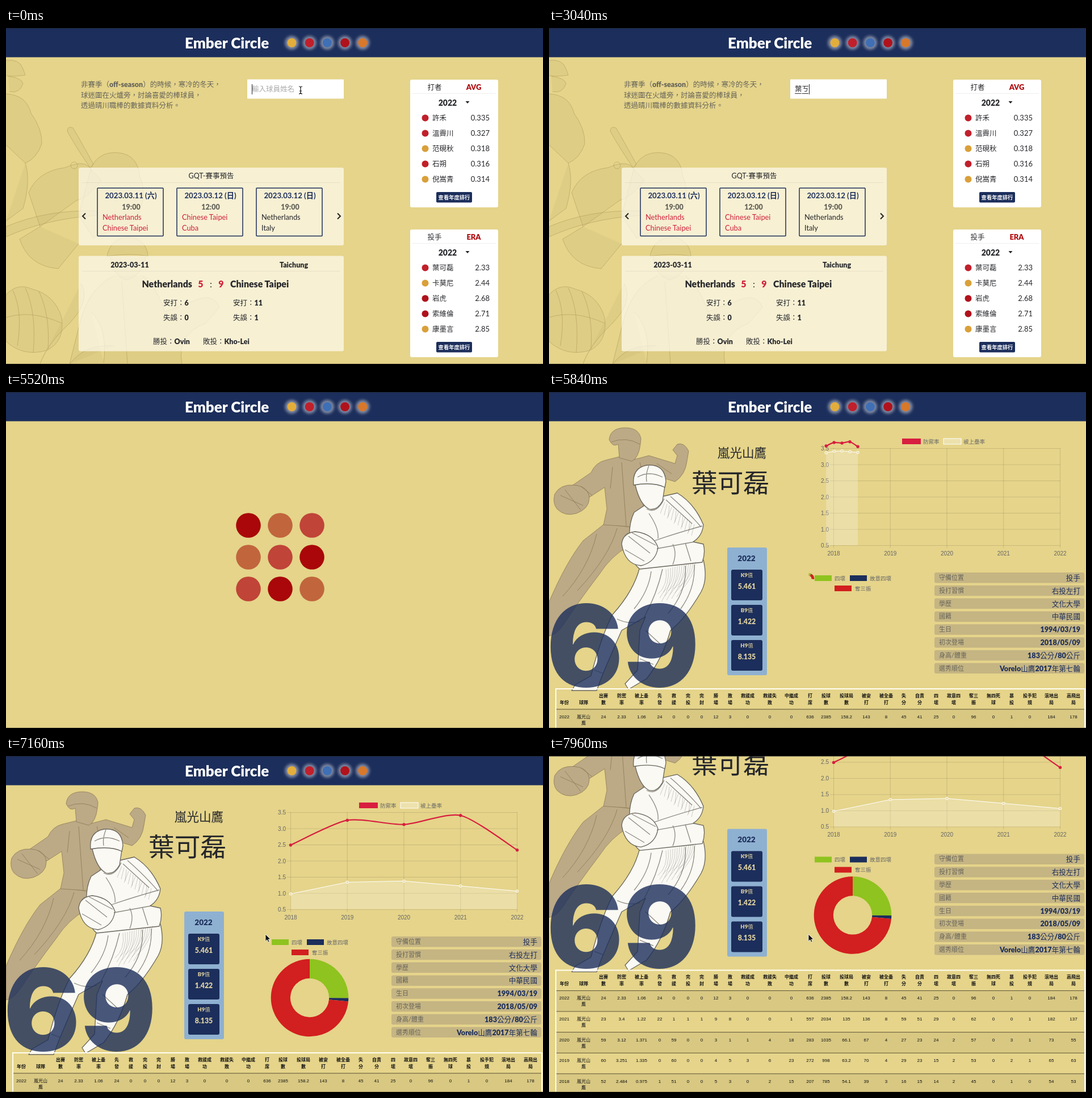
Recreate the animation shown at these times as an HTML page. Size 946 by 592 pixels, loop 8 s.

```html
<!DOCTYPE html>
<html lang="zh-Hant">
<head>
<meta charset="utf-8">
<style>
html, body { margin: 0; width: 100%; height: 100%; overflow: hidden; background: #e5d48a; }
svg { display: block; fill: #26272b; font-family: Lato, 'Noto Sans CJK TC', 'Noto Sans CJK', sans-serif; }
text { white-space: pre; }
.b { font-weight: 900; }
.m { text-anchor: middle; }
.e { text-anchor: end; }
.navy { fill: #1c2e5b; }
.red { fill: #d0213c; }
.gray { fill: #65635a; }
.white { fill: #fff; }
.axis { font-family: 'Liberation Sans', 'Noto Sans CJK TC', 'Noto Sans CJK', sans-serif; fill: #666; }
.cell { font-family: 'Liberation Sans', 'Noto Sans CJK TC', 'Noto Sans CJK', sans-serif; fill: #111; text-anchor: middle; }
</style>
</head>
<body>
<svg id="stage" width="946" height="592" viewBox="0 0 946 592"></svg>
<script>
const NAVY = '#1c2e5b', RED = '#d81e3f', PLAYER = '葉可磊', TEAM = '嵐光山鷹';
const GOLD = '#d9a03a', CRIMSON = '#c0202b', WINE = '#b0121c';

const text = (x, y, size, str, cls = '', more = '') =>
  `<text x="${x}" y="${y}" font-size="${size}" class="${cls}" ${more}>${str}</text>`;
const rect = (x, y, w, h, fill, more = '') =>
  `<rect x="${x}" y="${y}" width="${w}" height="${h}" fill="${fill}" ${more}/>`;
const path = (d, fill = 'none', more = '') => `<path d="${d}" fill="${fill}" ${more}/>`;
const dot = (x, y, r, fill, more = '') => `<circle cx="${x}" cy="${y}" r="${r}" fill="${fill}" ${more}/>`;
const boldLatin = s => s.replace(/[!-~]+/g, '<tspan class="b">$&</tspan>');
const each = (list, draw) => list.map(draw).join('');

function header() {
  const marks = ['#e3ad3c', CRIMSON, '#3f6fb5', WINE, '#d8782a'];
  return rect(0, 0, 946, 51.5, NAVY) + text(315, 36, 26, 'Ember Circle', 'b white') +
    each(marks, (c, i) => dot(503.5 + i * 31.2, 26, 12, '#fff', 'opacity=".45" filter="url(#glow)"') +
      dot(503.5 + i * 31.2, 26, 8, c));
}

function backdrop() {
  const shapes = [
    'M0 57Q24 54 30 72L34 83Q14 86 0 84M4 85Q28 88 30 98Q24 116 6 112M0 116Q36 118 44 150Q64 178 63 204Q54 230 34 238L0 206M34 238Q44 270 30 318L0 340',
    'M108 182Q108 172 118 176Q130 196 154 240L148 246Q122 208 108 182Z',
    'M40 290Q56 252 104 246Q140 230 150 250L168 268Q144 300 124 304L60 350ZM60 350L24 372Q40 420 92 424L128 380',
    'M150 246Q164 216 200 220Q232 224 236 262Q252 300 226 340L154 370L128 330Z',
    'M0 350Q70 320 160 322L162 330Q70 336 0 368Z',
    'M0 470Q20 448 46 460Q86 470 98 510Q104 552 72 568Q30 580 0 552ZM12 462Q30 500 20 560M34 458Q54 500 48 572M58 464Q78 506 74 566M0 510Q44 496 98 520',
    'M178 402Q184 370 218 368Q248 374 250 402Q220 396 178 402ZM184 404Q186 434 212 444Q240 436 246 404',
    'M192 436Q146 456 130 520L112 592H310Q300 540 352 520L376 492Q366 468 338 478L280 500Q262 450 240 436M204 446L214 592M150 500Q180 530 172 590',
    'M60 592Q70 560 112 520Q150 480 132 450M112 592Q140 556 190 560'
  ];
  return `<g stroke="#9d8850" stroke-opacity=".42" stroke-linejoin="round">` +
    each(shapes, d => path(d, '#b9a566', 'fill-opacity=".16"')) +
    dot(120, 242, 6, 'none') + '</g>';
}

function ranking(y, title, stat, rows) {
  return rect(712, y, 155, 225, '#fff', 'rx="3"') +
    text(755, y + 18, 12.5, title, 'm') +
    text(824, y + 18, 13, stat, 'b m', 'style="fill:#b00d10"') +
    rect(716, y + 24, 147, 1, '#eee') + text(778, y + 45.5, 14, '2022', 'b m') +
    path(`M809.5 ${y + 38}h7l-3.5 4z`, '#222') +
    each(rows, ([color, name, value], i) => {
      const cy = y + 67.5 + i * 27;
      return dot(738.5, cy, 6, color) + text(751, cy + 4.5, 12.5, name) + text(852, cy + 4, 13, value, 'e');
    }) +
    rect(758, y + 198, 63, 18.5, NAVY, 'rx="2"') +
    text(789.5, y + 210.5, 9.3, '查看年度排行', 'm white', 'font-weight="700"');
}

function home() {
  const games = [
    ['2023.03.11 (六)', '19:00', 'Netherlands', 'Chinese Taipei', 'red'],
    ['2023.03.12 (日)', '12:00', 'Chinese Taipei', 'Cuba', 'red'],
    ['2023.03.12 (日)', '19:00', 'Netherlands', 'Italy', '']
  ];
  const panel = (y, h) => rect(128, y, 467, h, '#fffdf3', 'fill-opacity=".7" rx="3"');
  const rule = y => rect(134, y, 455, 1, '#000', 'opacity=".06"');
  const intro = ['非賽季（off-season）的時候，寒冷的冬天，', '球迷圍在火爐旁，討論喜愛的棒球員，', '透過晴川職棒的數據資料分析。'];
  return backdrop() +
    each(intro, (s, i) => text(132, 104 + i * 18.7, 12.5, boldLatin(s), 'gray')) +
    rect(425, 90.5, 170, 34, '#fff', 'rx="1"') +
    text(433, 112, 12.5, '輸入球員姓名', '', 'id="hint" style="fill:#aaa"') +
    text(433, 112, 12.5, '', '', 'id="typed"') + '<path id="under" stroke="#333"/>' +
    rect(433, 99, 1, 18, '#222', 'id="caret"') +
    path('M516 103q3 0 3 2v9q0 2-3 2M522 103q-3 0-3 2v9q0 2 3 2M517 111h4', 'none', 'id="beam" stroke="#111" stroke-width="1.2"') +
    panel(246, 137) + text(361.5, 265, 12.5, 'GQT-賽事預告', 'm') + rule(272) +
    each(games, ([date, time, a, b, cls], i) => {
      const x = 161 + i * 140;
      return rect(x, 282, 116, 84.5, 'none', `stroke="${NAVY}" stroke-width="1.5" rx="1"`) +
        text(x + 59, 300, 13.2, date, 'm navy', 'font-weight="700"') +
        text(x + 59.5, 320, 12.5, time, 'm b gray') +
        text(x + 9, 338, 12.8, a, cls) + text(x + 9, 356.5, 12.8, b, cls);
    }) +
    path('M140 326.5l-5 5 5 5M584 326.5l5 5-5 5', 'none', 'stroke="#222" stroke-width="2"') +
    panel(401.5, 168) + rule(428) +
    text(218, 422, 12.5, '2023-03-11', 'm b') + text(507, 422, 12.5, 'Taichung', 'm b') +
    text(328, 457, 16, 'Netherlands', 'e b') + text(395, 457, 16, 'Chinese Taipei', 'b') +
    text(343, 457, 16, '5', 'm b red') + text(361, 457, 16, ':', 'm') + text(379, 457, 16, '9', 'm b red') +
    each([[277, 489, '安打：6'], [400, 489, '安打：11'], [277, 515, '失誤：0'], [400, 515, '失誤：1'],
      [259, 557, '勝投：Ovin'], [347, 557, '敗投：Kho-Lei']],
      ([x, y, s]) => text(x, y, 12.5, boldLatin(s))) +
    ranking(91, '打者', 'AVG', [[CRIMSON, '許禾', '0.335'], [CRIMSON, '溫霽川', '0.327'], [GOLD, '范硯秋', '0.318'],
      [CRIMSON, '石朔', '0.316'], [GOLD, '倪嵩青', '0.314']]) +
    ranking(355, '投手', 'ERA', [[CRIMSON, PLAYER, '2.33'], [GOLD, '卡莫尼', '2.44'], [WINE, '岩虎', '2.68'],
      [WINE, '索維倫', '2.71'], [GOLD, '康墨言', '2.85']]);
}

function loader() {
  const colors = ['#a90709', '#c1653d', '#c04438'];
  return each([...Array(9).keys()], i => {
    const col = i % 3, row = i / 3 | 0;
    return dot(427 + col * 56, 235 + row * 56, 21.8, colors[(col + row) % 3]);
  });
}

function pitchers() {
  const rear = [
    'M98 232L156 240L140 272Q110 288 88 322Q50 372 24 412Q12 428 0 430V370Q30 300 60 262Z',
    'M124 114L100 120Q82 124 74 142L42 164L64 190L98 168L102 206L96 234L186 240L196 150L222 158Q240 146 243 122L246 104Q238 88 226 92L218 102L226 112L222 126L176 112L146 120Z',
    'M106 84Q108 64 132 63Q158 62 162 82L161 92Q158 116 146 122L124 116L122 92Q112 98 106 84Z',
    'M10 180Q20 162 44 164Q70 166 71 188Q70 206 48 214Q28 220 14 206Q6 196 10 180Z'
  ];
  const front = [
    'M160 308L272 296Q280 330 268 352Q240 400 214 420Q200 470 172 505L140 524L134 514L156 490L160 420L170 396L128 420Q106 470 92 504L84 526H40L46 516L74 500Q92 430 112 392Q150 350 160 308Z',
    'M168 200L200 184L226 178Q256 196 272 234Q270 254 254 264L272 268Q276 284 270 300L160 312Q140 296 142 262Q140 232 150 212Z',
    'M152 164Q176 156 204 166L200 192Q190 210 176 206Q160 198 152 164Z',
    'M149 164Q146 134 172 129Q204 126 206 158L204 168Q184 158 149 164Z',
    'M128 268Q130 248 152 246Q184 250 192 274Q188 300 162 306Q134 304 128 268Z'
  ];
  const folds = 'M172 206Q190 216 203 188M206 190L252 232M214 184Q244 210 268 238M190 276L256 264M186 262Q220 250 270 236' +
    'M176 214Q194 240 192 258M218 268Q226 284 218 304M240 266L250 298M140 254L178 284M134 278L168 298M146 248L188 270' +
    'M240 306Q244 350 210 390M256 304Q258 346 232 382M180 316Q176 350 150 382M200 312Q190 356 168 396M120 400Q140 410 160 404' +
    'M170 420L196 444M160 470L184 480M80 490L96 496M156 150Q176 138 200 150M176 130Q170 144 172 158';
  const shade = 'M128 124L136 236M112 132L108 170M160 124Q174 170 160 236M190 126L216 144M56 166L76 182M20 182L60 200M28 172L56 208' +
    'M84 250Q70 310 24 360M120 240Q106 290 50 350M110 88Q136 78 160 92';
  const strokes = [...Array(14).keys()];
  const hatch = each(strokes, i => `M${206 + i * 4} ${312 - i}q${4 - i / 2} 28 -${14 + i} ${44 + i % 3 * 8}`) +
    each(strokes, i => `M${204 + i * 4} ${194 + i * 3}l${i % 3 * 3 - 8} 20`);
  return `<g stroke="#857452" stroke-opacity=".7" stroke-linejoin="round">` +
    each(rear, d => path(d, '#bca986')) + path(shade) + '</g>' +
    `<g stroke="#69655a" stroke-width="1.3" stroke-linejoin="round">` +
    each(front, d => path(d, '#faf9f4')) + path(folds, 'none', 'stroke-opacity=".75"') +
    path(hatch, 'none', 'stroke-opacity=".3" stroke-width="1"') + '</g>';
}

function lineAxes() {
  let out = '';
  for (let i = 0; i < 7; i++) {
    const y = 99 + i * 28.5;
    out += rect(495, y, 406, 1, '#000', 'opacity=".12"') + text(493, y + 4, 10, (3.5 - i / 2).toFixed(1), 'axis e');
  }
  for (let i = 0; i < 5; i++) {
    const x = 501 + i * 99.75;
    out += rect(x, 99, 1, 176, '#000', 'opacity=".12"') + text(x + .5, 288, 10, 2018 + i, 'axis m');
  }
  return out;
}

const HEADS = ('年份 球隊 出賽/數 防禦/率 被上壘/率 先/發 救/援 完/投 完/封 勝/場 敗/場 救援成/功 救援失/敗 中繼成/功 打/席 投球/數 投球局/數 ' +
  '被安/打 被全壘/打 失/分 自責/分 四/壞 故意四/壞 奪三/振 無四死/球 暴/投 投手犯/規 滾地出/局 高飛出/局').split(' ');
const COLS = [27, 61, 96, 128, 163, 195, 220, 245, 269, 294, 319, 350, 389, 427, 460, 488, 524, 559, 594, 625, 653, 682, 713, 748, 783, 815, 847, 885, 924];
const SEASONS = [
  '24 2.33 1.06 24 0 0 0 12 3 0 0 0 636 2385 158.2 143 8 45 41 25 0 96 0 1 0 184 178',
  '23 3.4 1.22 22 1 1 1 9 8 0 0 1 557 2034 135 136 8 59 51 29 0 62 0 0 1 182 137',
  '59 3.12 1.371 0 59 0 0 3 1 1 4 18 283 1035 66.1 67 4 27 23 24 2 57 0 3 1 73 55',
  '60 3.251 1.335 0 60 0 0 4 5 3 6 23 272 998 63.2 70 4 29 23 15 2 53 0 2 1 65 63',
  '52 2.484 0.975 1 51 0 0 5 3 0 2 15 207 785 54.1 39 3 16 15 14 2 45 0 1 0 54 53'
].map(s => s.split(' '));

function table() {
  const cell = (i, y, s) => text(COLS[i], y, 8, s, 'cell');
  return '<g font-weight="700">' + each(HEADS, (h, i) => {
      const [a, b] = h.split('/');
      return b ? cell(i, 538, a) + cell(i, 550, b) : cell(i, 550, a);
    }) + '</g>' +
    each(SEASONS, (row, r) => {
      const top = 558.5 + r * 36.6, y = top + 16.5;
      return (r % 2 ? '' : rect(12, top, 932, 36.6, '#000', 'opacity=".055"')) +
        rect(13, top, 930, 1, '#5d5538') + cell(0, y, 2022 - r) +
        cell(1, y, TEAM.slice(0, 3)) + cell(1, y + 11, TEAM[3]) + each(row, (v, i) => cell(i + 2, y, v));
    }) +
    rect(12, 523, 932, 230, 'none', 'stroke="#fffdf0" stroke-width="2"');
}

function profile() {
  const rates = [['K9', '5.461'], ['B9', '1.422'], ['H9', '8.135']];
  const facts = [['守備位置', '投手'], ['投打習慣', '右投左打'], ['學歷', '文化大學'], ['國籍', '中華民國'], ['生日', '1994/03/19'],
    ['初次登場', '2018/05/09'], ['身高/體重', '183公分/80公斤'], ['選秀順位', 'Vorelo山鷹2017年第七輪']];
  const key = (x, y, w, fill, label, gap, more) =>
    rect(x, y, w, 10, fill, more) + text(x + w + gap, y + 9, 9.5, label, 'axis');
  return pitchers() +
    text(-4, 518.5, 199, '69', 'navy', 'opacity=".8" style="font-family:Inter,sans-serif;font-weight:900"') +
    text(340, 115, 21.6, TEAM, 'm') + text(319.5, 177, 45.7, PLAYER, 'm') +
    rect(314, 274, 70, 225, '#8fb1d1', 'rx="3"') + text(348, 298, 13.5, '2022', 'm b navy') +
    each(rates, ([k, v], i) => {
      const y = 313 + i * 62;
      return rect(321, y, 55, 54, NAVY, 'rx="3"') + '<g style="fill:#ddd0a0">' +
        text(348.5, y + 13, 9.5, boldLatin(k + '值'), 'm') + text(348.5, y + 34, 12.3, v, 'm b') + '</g>';
    }) +
    lineAxes() + key(622, 82, 33, RED, '防禦率', 4) +
    key(695, 82, 31, '#fff', '被上壘率', 4, 'fill-opacity=".3" stroke="#fff"') +
    key(468, 323, 30, '#8fc31f', '四壞', 5) + key(530, 323, 30, NAVY, '故意四壞', 5) + key(503, 341, 30, '#d21f1f', '奪三振', 6) +
    '<g id="chart"></g>' +
    each(facts, ([k, v], i) => {
      const y = 318 + i * 22.8;
      return rect(679, y, 264, 18.5, '#c5b583', 'rx="3"') + text(687, y + 13, 11, k, 'gray') +
        text(936, y + 14, 12.6, boldLatin(v), 'e navy');
    }) + table();
}

const ERA = SEASONS.map(r => +r[1]).reverse(), WHIP = SEASONS.map(r => +r[2]).reverse();
const quart = t => 1 - (1 - Math.min(1, Math.max(0, t))) ** 4;
const mix = (a, b, p) => a + (b - a) * p;

function slice(a0, a1, cx, cy, R, fill) {
  const at = (a, r) => `${cx + r * Math.sin(a)} ${cy - r * Math.cos(a)}`;
  const big = a1 - a0 > Math.PI ? 1 : 0, r = R / 2;
  return path(`M${at(a0, R)}A${R} ${R} 0 ${big} 1 ${at(a1, R)}L${at(a1, r)}A${r} ${r} 0 ${big} 0 ${at(a0, r)}Z`, fill);
}

function charts(t) {
  const p = quart((t - 5804) / 1000), turn = quart((t - 5766) / 1000) * 2 * Math.PI;
  const place = list => list.map((v, i) => [mix(486, 501.5 + i * 99.75, p), mix(85, 270 - (v - .5) * 57, p)]);
  const era = place(ERA), whip = place(WHIP);
  const curve = era.slice(1).map((b, i) => {
    const a = era[i], before = era[i - 1] || a, after = era[i + 2] || b, k = .12;
    return `C${a[0] + (b[0] - before[0]) * k} ${a[1] + (b[1] - before[1]) * k} ` +
      `${b[0] - (after[0] - a[0]) * k} ${b[1] - (after[1] - a[1]) * k} ${b}`;
  }).join('');
  // shares of walks, intentional walks and strikeouts over all seasons
  const sums = [19, 20, 21].map(c => SEASONS.reduce((s, r) => s + +r[c], 0));
  const total = sums[0] + sums[1] + sums[2];
  let a = 0;
  return path(`M${whip.join('L')}L${whip[4][0]} 270L${whip[0][0]} 270Z`, '#fff', 'opacity=".24"') +
    path(`M${whip.join('L')}`, 'none', 'stroke="#fff"') + each(whip, q => dot(...q, 2.3, '#e9dda5', 'stroke="#fff"')) +
    path(`M${era[0]}${curve}`, 'none', `stroke="${RED}" stroke-width="2.2"`) + each(era, q => dot(...q, 2.7, RED)) +
    each(sums, (n, i) => slice(a, a += n / total * turn, mix(445, 535, p), mix(313, 426, p), 68.3 * p,
      ['#8fc31f', NAVY, '#d21f1f'][i]));
}

const stage = document.getElementById('stage');
stage.innerHTML = '<defs><filter id="glow" x="-50%" y="-50%" width="200%" height="200%"><feGaussianBlur stdDeviation="2.5"/></filter></defs>' +
  `<g id="page"><g id="home">${home()}</g><g id="load">${loader()}</g><g id="player">${profile()}</g>${header()}</g>` +
  path('M0 0V12.5L3 9.8L5 14.2L7 13.3L5.2 9H9Z', '#111', 'id="mouse" stroke="#fff" stroke-width=".8"') +
  rect(0, 0, 946, 1, '#1f2429', 'opacity=".7"') + rect(0, 591, 946, 1, '#8d8459', 'opacity=".7"');

const el = id => document.getElementById(id);
const show = (id, on) => el(id).style.display = on ? '' : 'none';
const TYPING = [[0, ''], [1320, 'ㄧ'], [1680, 'ㄧㄝ'], [2160, '葉'], [3000, '葉ㄎ'], [3300, '葉ㄎㄜ'], [3560, '葉可'],
  [3800, '葉可ㄌ'], [4080, '葉可ㄌㄟ'], [4400, PLAYER]];

function scrollAt(t) {
  if (t < 7180) return 0;
  if (t < 7360) return 147 * (1 - (1 - (t - 7180) / 180) ** 3);
  return 145.5 + 1.5 * Math.exp((7360 - t) / 150);
}

function draw(t) {
  show('home', t < 5520);
  show('load', t >= 5520 && t < 5800);
  show('player', t >= 5800);
  show('mouse', t >= 6880);
  el('page').setAttribute('transform', `translate(0 ${-scrollAt(t)})`);
  if (t < 5520) {
    const s = TYPING.filter(step => step[0] <= t).pop()[1];
    el('typed').textContent = s;
    el('under').setAttribute('d', t < 4760 ? [...s].map((c, i) => `M${433 + i * 12.5} 115.5h11.5`).join('') : '');
    el('caret').setAttribute('x', 433 + s.length * 12.5);
    show('caret', t < 520 || t >= 840);
    show('hint', !s);
    show('beam', !s);
  } else if (t >= 5800) {
    el('chart').innerHTML = charts(t);
    const p = quart((t - 6880) / 240);
    el('mouse').setAttribute('transform', `translate(${mix(500, 457, p)} ${mix(190, 314, p)})`);
  }
}

const start = performance.now();
(function tick() {
  draw((performance.now() - start) % 8000);
  requestAnimationFrame(tick);
})();
</script>
</body>
</html>
```
